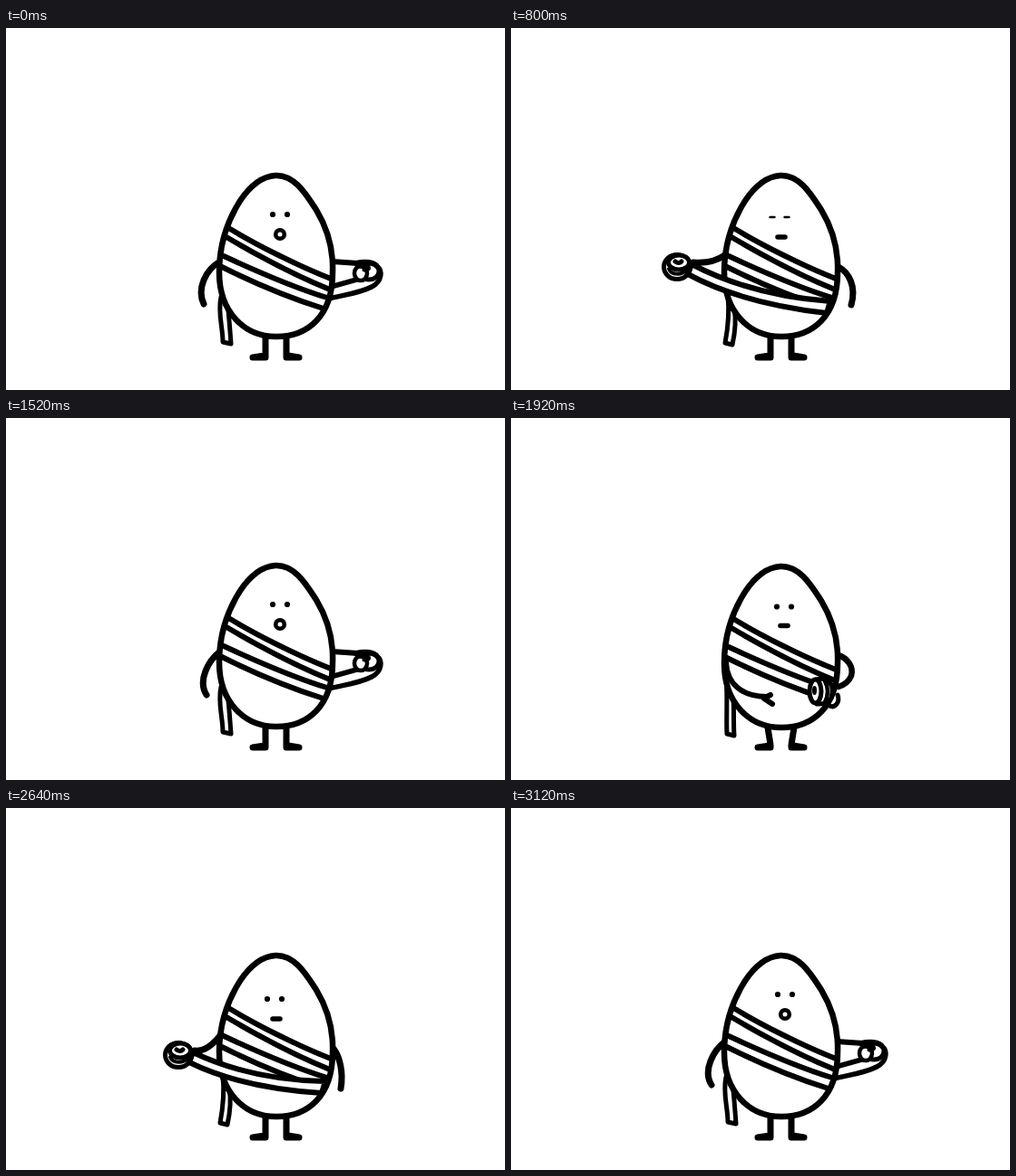
Recreate the animation shown at these times as an HTML page. Size 550 by 400 pixels, loop 3.2 s.

```html
<!DOCTYPE html>
<html lang="en">
<head>
<meta charset="utf-8">
<title>Egg wrapping itself</title>
<style>
html, body { margin: 0; width: 100%; height: 100%; overflow: hidden; background: #fff; }
svg { display: block; width: 550px; height: 400px; }
</style>
</head>
<body>
<svg id="stage" viewBox="0 0 550 400" fill="none" stroke="#000" stroke-linecap="round" stroke-linejoin="round"></svg>
<script>
const line = (d, w = 6, fill = 'none') => `<path d="${d}" stroke-width="${w}" fill="${fill}"/>`;
const oval = (x, y, rx, ry, w = 5, fill = '#fff') =>
  `<ellipse cx="${x}" cy="${y}" rx="${rx}" ry="${ry}" stroke-width="${w}" fill="${fill}"/>`;
const dot = (x, y, rx, ry = rx) => oval(x, y, rx, ry, 0, '#000');
const shift = (x, y, s) => `<g transform="translate(${x} ${y})">${s}</g>`;

const egg = line('M297 163C318 162 331 184 342 201C354 221 361 245 360 270C360 318 333 341 298 341C262 341 235 313 235 270C235 240 244 213 258 191C268 176 281 164 297 163Z', 6.5, '#fff');
const bands = [
  'M247 222C275 239 320 262 358 277',
  'M243 231C270 247 315 272 357 289',
  'M240 252C268 265 315 286 354 298',
  'M238 264C268 279 312 298 350 310'
].map(d => line(d)).join('');

const legs = low => {
  const s = low ? 3 : 0;
  return line(`M${286 - s} 342L286 361V364H272L285 362`, 7) +
    line(`M${309 + s} 342L309 361V364H323L311 362`, 7);
};

const tails = {
  right: 'M237 297C233 315 239 330 239 347L248 349C247 335 246 322 245 312',
  left: 'M239 296C241 315 239 332 236 348L244 350C247 336 248 320 246 310',
  front: 'M237 285C239 310 237 330 238 349L246 351C245 336 246 322 245 310'
};

const face = (ex, ey, mx, my, kind) => {
  const eyes = [-8, 8].map(s => kind === 'blink'
    ? line(`M${ex + s - 2.5} ${ey}h5`, 2.4) : dot(ex + s, ey, 3.1)).join('');
  return eyes + (kind === 'open' ? oval(mx, my, 4.8, 4.8, 4.6) : line(`M${mx - 4} ${my}h8`, 5.5));
};

// Roll seen from above, held by the left hand
const roll = (x, y) => shift(x, y,
  oval(0, 0, 14.5, 13.5) + oval(2, -5, 11.5, 8) +
  line('M-9 2C-6 10 6 9 11 3', 4) + line('M-2 -6Q2 -3 5 -6', 5));

// Tape pulled across the front to a roll at x, y
const pull = (x, y) => {
  const cx = (x + 347) / 2;
  return line(`M${x + 16} ${y - 3}Q${cx} ${(y + 327) / 2} 352 302L348 315Q${cx - 10} ${(y + 345) / 2} ${x + 12} ${y + 8}Z`, 6, '#fff') +
    (x < 215 ? line(`M${x + 18} ${y - 5}Q222 ${y - 3} 237 250`, 7)
             : line(`M237 264Q${x - 32} ${y} ${x - 8} ${y}`, 6)) + roll(x, y);
};

// Roll held out to the right, moved by dx, dy
const hold = (dx, dy) =>
  line(`M359 258L${388 + dx} ${260 + dy}`, 6) +
  line(`M356 299C372 295 ${390 + dx} ${293 + dy} ${403 + dx} ${286 + dy}C${415 + dx} ${280 + dy} ${415 + dx} ${268 + dy} ${409 + dx} ${263 + dy}L${390 + dx} ${277 + dy}L358 286Z`, 5.5, '#fff') +
  shift(dx, dy,
    oval(400, 269, 11, 9) + oval(391, 271, 7, 8, 4.5) +
    line('M385 260C394 258 403 258 408 262', 5.5) +
    line('M388 263L399 264Q401 267 395 267', 5));

const hang = d => line(d, 7);
const armLeft = hang('M236 258C220 267 210 288 218 305');
const armLeftIn = hang('M236 258C223 268 211 290 221 306');
const armRight = hang('M361 264C372 270 381 285 375 306');
const armRightIn = hang('M361 266C368 275 372 292 369 310');
const elbow = line('M360 262C371 265 378 275 375 285C372 292 367 295 361 297', 6.5);

const rightFace = [302, 206, 302, 228, 'open'];
const leftFace = [296, 209, 298, 231];
const poses = {
  right: { tail: 'right', back: armLeft + hold(0, 0), face: rightFace },
  rightIn: { tail: 'right', back: armLeftIn + hold(0, 0), face: rightFace },

  take: {
    dy: 1, tail: 'front', back: elbow, face: [301, 208.5, 301, 229.5],
    front: line('M351 318C357 321 363 314 360 306', 5, '#fff') +
      line('M336 289C350 286 357 294 353 309Q349 317 337 316', 5, '#fff') +
      line('M346 291Q352 302 346 314', 4.5) +
      oval(335.5, 302, 6.5, 13) + dot(334.5, 301, 2.5, 5) +
      line('M237 270C238 294 255 308 282 308L286 306M279 310L288 316', 6)
  },
  drag: { dy: 2, tail: 'front', back: elbow, face: [299, 212, 300, 234], front: pull(292, 306) },
  drag2: { dy: 1, tail: 'front', back: armRightIn, face: [297, 212, 298, 234], front: pull(235, 294) },
  drag3: { tail: 'left', back: armRightIn, face: [296, 210, 298, 232], front: pull(192, 272) },

  leftIn: { tail: 'left', back: armRightIn, front: pull(183, 264), face: leftFace },
  left: { tail: 'left', back: armRight, front: pull(183, 264), face: leftFace },
  blink: { tail: 'left', back: armRight, front: pull(183, 264), face: [...leftFace, 'blink'] },

  back: { tail: 'left', back: armRightIn, face: [296, 211, 298, 233], front: pull(190, 273) },
  back2: {
    dy: 1, tail: 'front', face: [297, 213, 298, 235],
    front: pull(245, 298) + line('M360 270C356 288 345 300 328 306', 6)
  },
  pass: {
    dy: 2, tail: 'front', face: [298.5, 213, 299, 236],
    front: line('M238 266C250 285 272 301 302 306', 6) +
      line('M360 284C364 307 362 335 337 340C325 341 315 331 313 321L325 317Q330 326 338 325C350 322 356 309 354 296Z', 5.5, '#fff') +
      line('M359 277C351 288 341 294 328 298', 7) + line('M352 301Q354 312 345 318', 7) +
      line('M311 294C322 291 328 300 325 312Q322 321 311 320', 5, '#fff') +
      line('M315 295Q321 307 316 319', 4.5) + oval(309, 307, 4.5, 12.5)
  },
  turn: {
    dy: 2, tail: 'front', back: elbow, face: [300, 210, 300, 232],
    front: line('M238 274C240 296 252 309 269 313L276 315M266 314L277 320', 6) +
      line('M345 300C337 315 337 335 348 337C358 337 361 323 358 310C356 300 362 296 364 287C364 278 357 277 350 281Z', 5.5, '#fff') +
      line('M355 287C345 300 345 312 352 324', 4.5) + oval(342, 290, 6, 10)
  },
  reach: {
    dy: 1, tail: 'front', back: hang('M236 262C226 277 225 296 233 309') + hold(-24, 13),
    face: [301, 208, 301, 230]
  },
  reach2: { tail: 'right', back: hang('M236 260C223 271 217 291 225 307') + hold(-9, 5), face: [302, 207, 302, 229] }
};

const draw = p => legs(p.dy) + line(tails[p.tail], 5, '#fff') + (p.back || '') +
  shift(0, p.dy || 0, egg + bands) + (p.front || '') + face(...p.face);

// Start time and pose
const steps = [
  [0, 'right'], [320, 'take'], [400, 'drag'], [480, 'drag2'], [560, 'drag3'],
  [640, 'leftIn'], [720, 'left'], [800, 'blink'], [960, 'left'],
  [1040, 'back'], [1120, 'back2'], [1200, 'pass'], [1280, 'turn'],
  [1360, 'reach'], [1440, 'reach2'], [1520, 'rightIn']
];
const again = steps.filter(([t]) => t !== 960).map(([t, name]) => [t + 1600, name]);
const timeline = [...steps, ...again];
const loop = 3200;

const stage = document.getElementById('stage');
stage.innerHTML = Object.entries(poses)
  .map(([name, p]) => `<g id="${name}" display="none">${draw(p)}</g>`).join('');

let shown;
const start = performance.now();
function tick() {
  const t = Math.max(0, performance.now() - start) % loop;
  const name = timeline.filter(s => s[0] <= t).pop()[1];
  if (name !== shown) {
    if (shown) document.getElementById(shown).setAttribute('display', 'none');
    document.getElementById(name).removeAttribute('display');
    shown = name;
  }
  requestAnimationFrame(tick);
}
tick();
</script>
</body>
</html>
```
